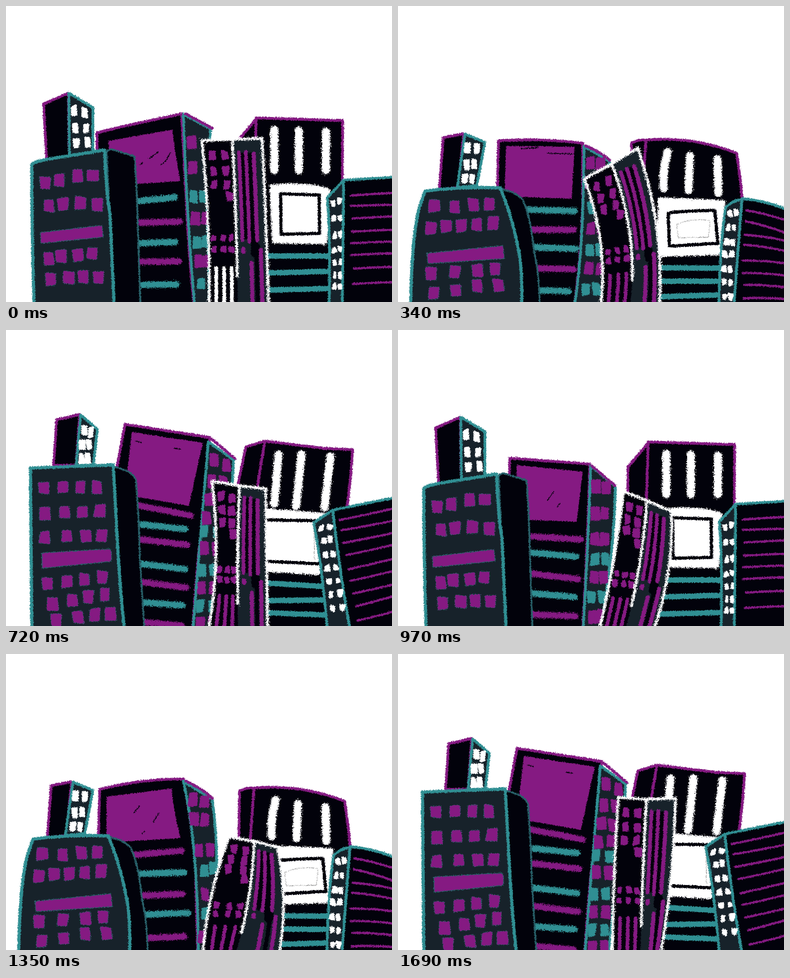
Recreate the animation shown at these times as an HTML page. Size 853x656 px, loop 1.94 s.

```html
<!DOCTYPE html>
<html lang="en">
<head>
<meta charset="utf-8">
<title>Swaying city</title>
<style>
html, body { margin: 0; width: 100%; height: 100%; overflow: hidden; background: #fff; }
svg { display: block; width: 100%; height: 100%; }
path { stroke-linejoin: round; stroke-linecap: round; }
</style>
</head>
<body>
<svg id="stage" viewBox="0 0 853 656">
  <defs>
    <filter id="rough" filterUnits="userSpaceOnUse" x="-10" y="-10" width="880" height="690" color-interpolation-filters="sRGB">
      <feTurbulence type="fractalNoise" baseFrequency=".4" numOctaves="2" seed="4"/>
      <feDisplacementMap in="SourceGraphic" scale="6" xChannelSelector="R" yChannelSelector="G"/>
    </filter>
    <filter id="chalk" filterUnits="userSpaceOnUse" x="-10" y="-10" width="880" height="690" color-interpolation-filters="sRGB">
      <feTurbulence type="fractalNoise" baseFrequency=".6" numOctaves="2" seed="9"/>
      <feDisplacementMap in="SourceGraphic" scale="11" xChannelSelector="R" yChannelSelector="G"/>
    </filter>
  </defs>
</svg>
<script>
const LOOP = 1940, FLOOR = 656;
const BLACK = '#02020b', SLATE = '#17222a', PURPLE = '#851a82', TEAL = '#308f93', RIM = '#28616a', WHITE = '#fff';

let seed = 7;
const jitter = r => ((seed = seed * 16807 % 2147483647) / 2147483647 - .5) * 2 * r;
const nums = s => s.trim().split(/[\s,]+/).map(Number);
const groups = (s, n) => {
  const a = nums(s), out = [];
  for (let i = 0; i < a.length; i += n) out.push(a.slice(i, i + n));
  return out;
};

const shape = (fill, stroke, width, d) => `<path d="${d}" fill="${fill}" stroke="${stroke}" stroke-width="${width}"/>`;
const fill = (color, d) => shape(color, 'none', 0, d);
const line = (color, width, d) => shape('none', color, width, d);
const chalk = s => `<g filter="url(#chalk)">${s}</g>`;

// Hand-cut rectangles centred on each "x y" pair
const panes = (color, w, h, pts, rim) => groups(pts, 2).map(([x, y]) => {
  const c = [[-1, -1], [1, -1], [1, 1], [-1, 1]].map(([a, b]) =>
    `${(x + a * (w / 2 - 3) + jitter(2)).toFixed(1)} ${(y + b * (h / 2 - 3) + jitter(2)).toFixed(1)}`);
  const d = `M${c.join('L')}Z`;
  return (rim ? shape(rim, rim, 7.5, d) : '') + shape(color, color, 6, d);
}).join('');

// Left block with the small tower behind it
const leftBlock = p =>
  shape(BLACK, PURPLE, 6, p.wall) + shape(SLATE, TEAL, 6, p.lit) +
  panes(WHITE, 14, 23, p.dots) +
  shape(BLACK, RIM, 4, p.side) + shape(SLATE, TEAL, 7, p.face) +
  panes(PURPLE, 23, 27, p.win, RIM) + shape(PURPLE, RIM, 1.5, p.bar);

const leftPoses = [
  { wall: 'M83 217L138 193L140 340L90 345Z', lit: 'M139 193L192 225L192 325L140 338Z',
    dots: '150 232 173 237 152 271 177 271 156 304 181 302',
    side: 'M222 322L232 317L284 333Q290 420 291 480L297 664H238L228 450Z',
    face: 'M57 351Q70 343 90 340L218 319Q220 400 230 465Q234 560 239 664H62Q57 500 57 351Z',
    bar: 'M76 502L212 486L215 512L77 526Z',
    win: '86 391 119 386 158 377 192 376 94 443 126 439 164 436 202 440 94 561 122 555 159 553 190 548 100 606 139 602 170 600 204 600' },
  { wall: 'M87 278L137 256L139 380L91 387Z', lit: 'M138 261L190 286L190 380L138 380Z',
    dots: '153 293 176 296 157 328 177 328 158 360 179 360',
    side: 'M222 382Q280 392 288 412Q300 470 306 540L312 664H257Q262 560 250 500Z',
    face: 'M62 393Q140 373 218 380Q240 440 252 510Q261 580 258 664H36Q38 560 44 510Q52 440 62 393Z',
    bar: 'M64 538L230 520L234 548L68 562Z',
    win: '91 431 129 425 165 423 200 420 69 485 101 480 138 474 176 473 207 469 70 586 125 581 171 574 211 573 79 628 128 621 171 613 218 610' },
  { wall: 'M100 292L145 283L133 402L91 407Z', lit: 'M148 284L192 302L174 398L131 402Z',
    dots: '154 315 173 317 152 351 168 351 148 383 163 383',
    side: 'M226 405Q262 412 276 430Q294 470 300 540Q312 590 313 664H272Q278 560 250 470Z',
    face: 'M60 410Q140 400 226 403Q250 460 264 530Q276 580 273 664H28Q30 520 46 450Z',
    bar: 'M64 548L232 531L235 560L66 571Z',
    win: '80 443 125 445 167 440 201 439 73 492 106 488 141 487 175 484 210 481 73 593 126 589 175 586 214 582 79 635 128 631 175 621 222 618' },
  { wall: 'M112 199L163 187L155 300L105 300Z', lit: 'M165 188L202 220L193 298L155 300Z',
    dots: '172 223 187 227 168 254 184 254 167 285 181 284',
    side: 'M238 303Q281 313 287 332Q293 400 296 510L306 664H260L246 470Z',
    face: 'M54 306L237 299L245 450Q252 580 262 664H57Z',
    bar: 'M79 494L230 485Q236 500 232 513L80 528Z',
    win: '84 350 126 348 164 349 200 348 86 407 130 403 168 403 207 400 86 460 134 457 176 457 212 454 91 563 134 557 173 553 212 547 104 607 147 600 182 591 218 586 111 643 159 637 196 631 232 629' }
];

// Billboard block; bars are "x1 y1 x2 y2" in alternating colours
const billboard = p => {
  const ink = i => (i + p.first) % 2 ? TEAL : PURPLE;
  return shape(BLACK, PURPLE, 6, p.front) + shape(SLATE, TEAL, 6, p.side) + line(PURPLE, 6, p.roof) +
    fill(PURPLE, p.sign) + line(BLACK, 2, p.scratch) +
    chalk(groups(p.bars, 4).map(([a, b, c, d], i) => line(ink(i), 14, `M${a} ${b}L${c - 6} ${d}`)).join('')) +
    panes(PURPLE, 20, 29, p.win) + panes(TEAL, 19, 27, p.teal);
};

const signPoses = [
  { front: 'M201 281L262 266L388 239Q394 350 398 420Q404 560 416 664H203Z',
    side: 'M392 240L452 272Q440 400 446 500L450 664H417Q400 480 392 240Z', roof: 'M397 239L456 271',
    sign: 'M226 299L368 274Q374 330 385 388L235 398Z', scratch: 'M316 338L336 324M343 352Q354 345 364 324M296 352L302 347',
    first: 1, bars: '285 433 378 424 285 480 390 478 285 526 380 523 285 567 388 566 285 618 383 617',
    win: '411 302 412 358 418 471 441 470 425 566 443 566', teal: '414 423 436 423 421 524 441 522 432 615' },
  { front: 'M207 300Q300 276 392 277Q408 360 418 450L424 664H197Z',
    side: 'M392 282L456 322Q466 400 466 480L455 664H425Q424 420 392 282Z', roof: 'M397 281Q440 303 456 320',
    sign: 'M222 316L366 298Q370 350 386 408L222 418Z', scratch: 'M282 352L296 336M326 372L338 352M300 398L308 392',
    first: 0, bars: '270 446 394 436 275 488 400 484 280 536 395 532 290 578 408 574 300 630 400 626',
    win: '413 322 438 327 416 367 440 367 427 434 452 434 440 533 434 626', teal: '438 480 457 474 441 575' },
  { front: 'M222 299Q310 292 408 304L408 440Q404 560 390 664H214Z',
    side: 'M411 311L467 344L465 480Q460 590 448 664H390Q410 540 411 311Z', roof: 'M415 310Q450 325 468 342',
    sign: 'M239 310L390 312L384 427L235 422Z', scratch: 'M272 316L310 314M330 326L384 328',
    first: 1, bars: '270 451 396 454 270 495 394 496 290 534 400 538 290 581 394 583 300 630 383 632',
    win: '425 348 447 350 425 390 447 390 427 494 450 492 422 581 447 582', teal: '428 449 451 447 423 540 446 540 414 627 438 627' },
  { front: 'M247 284L300 288L424 297Q420 450 408 664H236Z',
    side: 'M426 301L480 346Q479 440 468 520L450 664H409Q420 480 426 301Z', roof: 'M428 301L480 345',
    sign: 'M262 299L408 314L395 425L262 420Z', scratch: 'M330 378L344 358M352 392L358 384',
    first: 0, bars: '270 456 410 464 270 491 400 502 280 538 404 552 280 582 396 592 280 630 398 634',
    win: '437 347 459 350 436 407 457 407 435 463 456 464 433 548 455 548 429 637 448 634', teal: '435 508 457 508 428 593 452 592' },
  { front: 'M263 209L450 238Q440 400 425 500L412 664H245V305Z',
    side: 'M447 248L503 288Q498 400 485 480L465 664H413Q430 450 447 248Z', roof: 'M455 242L506 285',
    sign: 'M278 226L435 250L404 390L262 365Z', scratch: 'M286 246L300 250M372 262L386 264',
    first: 0, bars: '270 384 414 411 280 429 402 441 280 462 406 476 280 516 402 530 280 556 404 571 290 603 396 610 300 647 394 655',
    win: '459 287 487 300 456 336 481 338 449 376 475 380 443 416 470 414 437 483 466 485 432 571 459 572 429 650 456 650',
    teal: '438 447 468 449 433 533 458 531 428 612 456 612' }
];

// Wide block with white strips and a white panel
const wideBlock = p =>
  shape(BLACK, PURPLE, 6, p.side) + shape(BLACK, PURPLE, 6, p.front) +
  chalk(line(WHITE, 18, p.strips) + shape(WHITE, WHITE, 8, p.panel)) +
  line(BLACK, 7, p.ring) + line('#555', .6, p.mark) +
  groups(p.bars, 2).map(([a, b]) => line(TEAL, 12, `M560 ${a}L716 ${b}`)).join('');

const widePoses = [
  { side: 'M508 304L553 250L549 380V664H506Z', front: 'M553 248L744 254L741 664H549V380Z',
    strips: 'M593 274V364M647 276V364M707 278V364', panel: 'M586 400Q660 392 712 408L706 524L592 522Z',
    ring: 'M607 416L692 419L693 504L608 506Z', mark: '', bars: '554 554 592 588 630 626' },
  { side: 'M519 290Q535 278 552 278L542 390V664H515Z', front: 'M552 277Q650 270 742 300Q750 360 754 420L740 664H542V390Z',
    strips: 'M597 299L592 394M643 301L645 396M705 308V399', panel: 'M580 418L718 424L712 537L580 533Z',
    ring: 'M612 440L697 446L696 515L612 517Z', mark: 'M624 460L688 462L680 500L624 498Z', bars: '566 564 601 595 642 630' },
  { side: 'M516 304Q530 295 548 297L540 410V664H511Z', front: 'M548 297Q650 288 748 326Q757 380 760 425L740 664H540V410Z',
    strips: 'M596 323Q585 360 587 404M645 332L642 408M706 340L708 414', panel: 'M578 428L720 434L713 548L578 552Z',
    ring: 'M597 460Q600 455 700 453L707 526L600 532Z', mark: 'M616 484Q650 468 690 476L686 512L620 514Z', bars: '580 581 610 610 645 640' },
  { side: 'M530 259L572 246L556 345V664H512V345Z', front: 'M572 246L700 262L766 265Q762 330 754 390L740 664H556V345Z',
    strips: 'M602 276L593 385M653 275L641 390M717 280L704 393', panel: 'M560 398L712 410L690 539L560 531Z',
    ring: 'M540 420L690 423M540 511L692 518', mark: 'M680 430L682 510', bars: '560 569 600 598 626 632' }
];

// Right-hand block; lines are "x y1 y2", running off the stage
const rightBlock = p =>
  shape(BLACK, TEAL, 6, p.front) + shape(SLATE, TEAL, 6, p.side) + panes(WHITE, p.dot || 11, 15, p.dots) +
  groups(p.lines, 3).map(([x, a, b]) => line(PURPLE, 5, `M${x} ${a}Q${(x + 860) / 2} ${(a + b) / 2 - p.bow} 860 ${b}`)).join('');

const rightPoses = [
  { side: 'M710 425L746 386Q744 520 743 664H714Q717 500 710 425Z', front: 'M746 386L862 379V664H743Z', bow: 1, dot: 9,
    dots: '722 437 737 431 724 470 737 470 726 508 738 506 726 541 738 539 727 569 738 568 727 597 738 597 726 622 737 622',
    lines: '762 420 414 762 443 441 765 471 466 764 500 496 763 526 522 762 552 548 768 582 578 766 616 612' },
  { side: 'M710 438Q725 426 745 422Q734 530 746 664H705Q703 500 710 438Z', front: 'M745 422Q800 413 862 425V664H746Q734 530 745 422Z', bow: 5,
    dots: '717 453 730 456 713 491 727 492 712 524 726 523 709 559 724 558 712 588 726 588 714 620 727 620 716 648 730 647',
    lines: '754 444 447 755 471 466 754 496 494 754 522 514 757 558 550 757 592 578 757 624 608 763 650 642' },
  { side: 'M724 447Q735 433 760 428L742 664H709Q712 520 724 447Z', front: 'M760 427Q810 431 862 452V664H742Z', bow: 4,
    dots: '733 459 747 458 730 491 741 491 726 523 738 523 723 550 737 550 720 583 734 584 720 612 734 614 721 644 735 645',
    lines: '770 453 476 768 477 504 766 507 521 765 529 544 762 564 571 762 592 598 765 618 624 764 648 650' },
  { side: 'M680 427L722 399Q738 540 760 664H710Q698 520 680 427Z', front: 'M722 399L862 371V664H760Q738 540 722 399Z', bow: -1, dot: 12,
    dots: '697 440 716 437 702 468 716 464 706 498 723 496 710 528 728 527 714 558 733 555 718 587 739 583 722 616 743 616',
    lines: '738 421 395 741 444 422 745 472 449 752 499 475 757 530 506 761 556 533 767 584 563 774 612 589 777 644 623' }
];

// Bending tower: for its left, middle and right edges, top x, top y, x halfway, x at the floor
const bends = [
  '433 298 446 449 500 296 508 512 566 293 574 580',
  '412 383 447 449 472 350 512 514 530 315 571 578',
  '455 335 464 449 516 345 512 513 574 352 576 578',
  '498 358 477 447 550 378 534 505 604 402 598 568',
  '500 385 469 446 547 398 529 510 604 412 606 585',
  '493 405 455 436 548 415 537 510 600 428 613 605',
  '487 318 478 474 549 322 541 536 613 320 604 582'
].map(nums);
const between = (a, b) => a.map((n, i) => (n + b[i]) / 2);

const bentTower = (b, stripe = PURPLE) => {
  const edge = (i, v) => {
    const [x, y, m, f] = b.slice(i * 4, i * 4 + 4);
    return [x * (1 - v) * (1 - 2 * v) + m * 4 * v * (1 - v) + f * v * (2 * v - 1), y + (FLOOR - y) * v];
  };
  const at = (side, u, v) => {
    const p = edge(side, v), q = edge(side + 1, v);
    return p.map((n, i) => (n + (q[i] - n) * u).toFixed(1)).join(' ');
  };
  const run = (side, u, from, to) =>
    Array.from({ length: 11 }, (_, i) => at(side, u, from + (to - from) * i / 10));
  const path = (...a) => 'M' + run(...a).join('L');
  const face = side => `M${run(side, 0, 0, 1.04).concat(run(side, 1, 1.04, 0)).join('L')}Z`;
  const cells = (us, vs) => vs.flatMap(v => us.map(u => at(0, u, v))).join(' ');

  return fill(BLACK, face(0)) + fill(SLATE, face(1)) +
    panes(PURPLE, 15, 21, cells([.3, .72], [.095, .19, .275]) + ' ' + at(0, .8, .35)) +
    panes(PURPLE, 12, 15, cells([.2, .53, .82], [.605, .675])) +
    [.25, .53, .8].map(u => line(stripe, 8, path(0, u, .79, 1.04))).join('') +
    line(BLACK, 12, path(1, .32, .1, .6)) + line(BLACK, 12, path(1, .56, .1, .66)) +
    line(BLACK, 20, path(1, .62, .66, .7)) + line(BLACK, 9, path(1, .65, .7, 1.04)) +
    line(PURPLE, 8, path(1, .2, .08, .62)) + line(PURPLE, 8, path(1, .43, .08, .63)) +
    line(PURPLE, 9, path(1, .69, .09, .62)) + line(PURPLE, 10, path(1, .22, .675, .69)) +
    line(PURPLE, 9, path(1, .48, .76, 1.04)) + line(PURPLE, 9, path(1, .8, .68, 1)) +
    chalk(line(WHITE, 6, path(0, 0, 0, 1.04)) + line(WHITE, 6, path(0, 1, 0, .84)) +
      line(WHITE, 6, path(1, 1, 0, 1.04)) + line(WHITE, 6, `M${at(0, 0, 0)}L${at(0, 1, 0)}L${at(1, 1, 0)}`));
};

// steps: [start time, pose index]
const stage = document.getElementById('stage');
const play = (poses, steps) => poses.forEach((art, i) => {
  const g = document.createElementNS('http://www.w3.org/2000/svg', 'g');
  g.setAttribute('filter', 'url(#rough)');
  g.innerHTML = art;
  stage.append(g);
  const keys = [...steps, [LOOP, steps[steps.length - 1][1]]].map(([t, p]) =>
    ({ offset: t / LOOP, visibility: p === i ? 'visible' : 'hidden', easing: 'steps(1, end)' }));
  g.animate(keys, { duration: LOOP, iterations: Infinity });
});

const beats = [0, 130, 340, 510, 720];
const bounce = [0, 970].flatMap(t0 => beats.map((t, i) => [t0 + t, [0, 1, 2, 4, 3][i]]));
const back = [970, 1180, 1350, 1560, 1690];
const sway = [...beats.map((t, i) => [t, i]), ...back.map((t, i) => [t, [3, 2, 1, 0, 4][i]])];
const bend = [...beats, ...back].map((t, i) => [t, i]);

const withRise = art => [...art, `<g transform="matrix(1 0 0 1.015 0 -9.8)">${art[1]}</g>`];
const [c0, c1, c2, c3, c4, c5, c6] = bends;

play(withRise(widePoses.map(wideBlock)), bounce);
play(signPoses.map(billboard), sway);
play(withRise(leftPoses.map(leftBlock)), bounce);
play([c0, between(c0, c1), c1, between(c1, c2), c2, c3, c4, c5, between(c5, c6), c6]
  .map((b, i) => bentTower(b, i ? PURPLE : WHITE)), bend);
play(withRise(rightPoses.map(rightBlock)), bounce);
</script>
</body>
</html>
```
